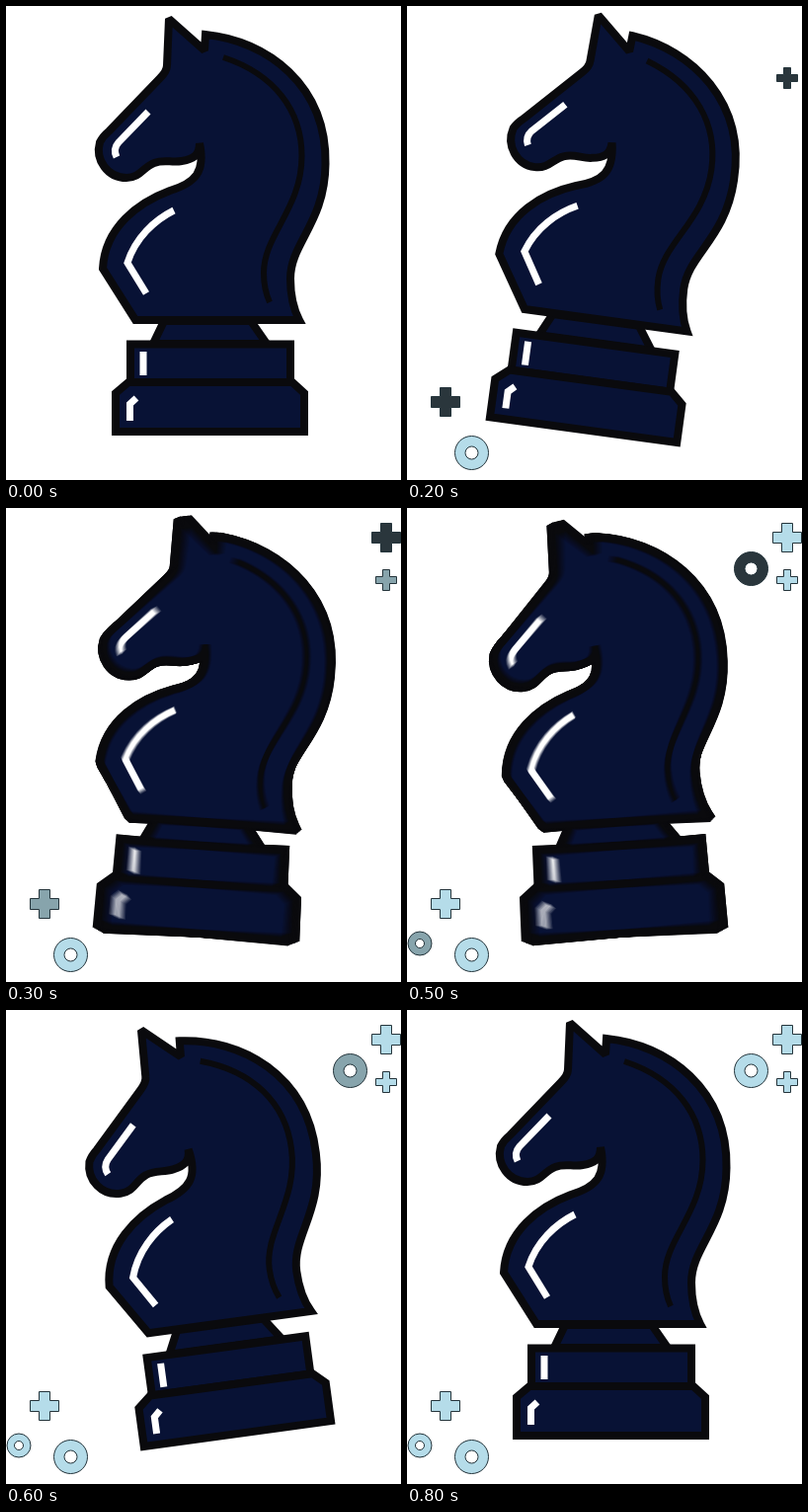
An HTML page that plays this animation: 400 by 480 pixels, repeating every 900 ms.

```html
<!DOCTYPE html>
<html lang="en">
<head>
<meta charset="utf-8">
<title>Chess knight</title>
<style>
  html, body { margin: 0; width: 100%; height: 100%; overflow: hidden; background: #fff; }
  svg { display: block; width: 100vw; height: 100vh; }
</style>
</head>
<body>
<svg viewBox="0 0 400 480">
  <defs>
    <g id="body" stroke="#0a0a0d" stroke-width="8" stroke-miterlimit="2.2">
      <path d="M160 319 L149 342 H264 L248 319 Z"/>
      <path d="M126 342.5 H288 V381 H126 Z"/>
      <path d="M124 381 L111 392 V431 H302 V392 L290 381 Z"/>
      <path d="M165 13 L201 45 L202 29 C264 35 325 80 323.500 160
        C323 220 288 240 288 276 Q288 301 297 318 H131 L98 266
        C100 224 134 199 166 187 C192 179 202 168 196 139
        C196 151 190 155 178 157 C168 159 160 155 150 159
        C139 163 136 174 122 174 C103 174 90 156 95 138
        Q98 132 104 127 L156 73 Q163 66 163 60 Z"/>
    </g>
    <g id="lines" fill="none" stroke-width="6">
      <path stroke="#0a0a0d" stroke-linejoin="round"
        d="M220 52 C272 69 299.500 106 299.500 152 C299.500 205 261 232 261 270 Q261 287 267 300"/>
      <path stroke="#fff" stroke-width="7" d="M144 107 L114 138 Q108 145 112 153
        M170 207 C150 217 131 235 123 260 L142 291 M139 350 V374 M125.500 420 V403 L132 397"/>
    </g>
  </defs>
  <g id="bits" stroke="#24343b" stroke-width="1"></g>
  <g id="shade" fill="#0a0a0d"></g>
  <g id="knight" fill="#081235"></g>
</svg>
<script>
const STEP = 100, STEPS = 9, COPIES = 9;
const TILT = 3.87, BLUR = 1.5;
const SWING = [0, 1, 2, 1, 0, -1, -2, -1, 0];
const TONES = ['#2a363c', '#87a4ac', '#b5dce9'];

const byId = id => document.getElementById(id);

function add(parent, tag, attrs) {
  const el = document.createElementNS('http://www.w3.org/2000/svg', tag);
  for (const key in attrs) el.setAttribute(key, attrs[key]);
  return parent.appendChild(el);
}

function plus(x, y, r, w) {
  const n = r - w;
  return `M${x - w} ${y - r}h${2 * w}v${n}h${n}v${2 * w}h${-n}v${n}h${-2 * w}v${-n}h${-n}v${-2 * w}h${n}z`;
}

function disc(x, y, r) {
  return `M${x - r} ${y}a${r} ${r} 0 1 0 ${2 * r} 0a${r} ${r} 0 1 0 ${-2 * r} 0z`;
}

const ring = (x, y, r, hole) => disc(x, y, r) + disc(x, y, hole);

// Each bit starts dark at its step and lightens over the next two.
const bits = [
  [0, ring(65.5, 452.5, 17, 6.5)],
  [2, plus(39, 401, 14.5, 5.5)],
  [2, plus(385, 73, 10.5, 3.5)],
  [3, plus(385, 30, 14.5, 5.5)],
  [4, ring(13, 441, 12, 4.5)],
  [5, ring(348.5, 61.5, 17, 6.5)]
].map(([start, d]) => ({ start, el: add(byId('bits'), 'path', { d, 'fill-rule': 'evenodd' }) }));

const copies = Array.from({ length: COPIES }, (_, i) => {
  const shade = add(byId('shade'), 'use', { href: '#body' });
  const knight = add(byId('knight'), 'g', { opacity: 1 / (i + 1) });
  add(knight, 'use', { href: '#body' });
  add(knight, 'use', { href: '#lines' });
  return { shade, knight };
});

// Passing poses are smeared over a small arc; resting poses are sharp.
function draw(time) {
  const step = Math.floor(time / STEP) % STEPS;
  const moving = step % 2 === 1;
  const angle = SWING[step] * TILT;

  byId('shade').style.display = moving ? '' : 'none';
  copies.forEach(({ shade, knight }, i) => {
    const offset = moving ? BLUR * (2 * i / (COPIES - 1) - 1) : 0;
    const turn = `rotate(${angle + offset} 206 224)`;
    shade.setAttribute('transform', turn);
    knight.setAttribute('transform', turn);
    knight.style.display = moving || i === 0 ? '' : 'none';
  });

  bits.forEach(({ start, el }) => {
    const age = step - start;
    el.style.display = step > 0 && age >= 0 ? '' : 'none';
    el.setAttribute('fill', TONES[Math.max(0, Math.min(age, 2))]);
  });
}

const began = performance.now();
function tick() {
  draw(performance.now() - began);
  requestAnimationFrame(tick);
}
tick();
</script>
</body>
</html>
```
